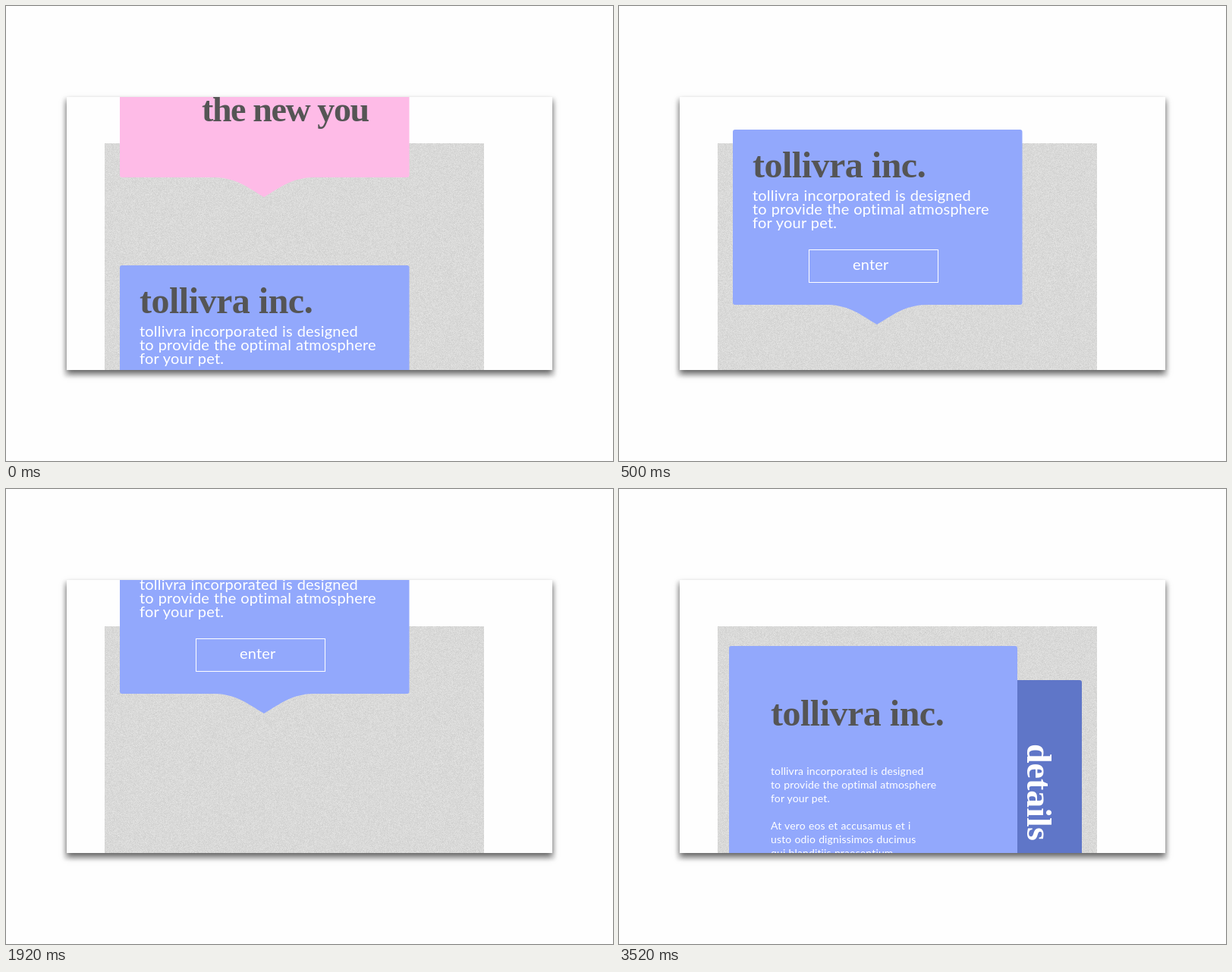
An HTML page with a canvas for the animation above (3.54 s loop, 800 by 600 pixels).

```html
<!DOCTYPE html>
<html lang="en">
<head>
<meta charset="utf-8">
<title>Card transition</title>
<style>
  html, body { margin: 0; width: 100%; height: 100%; overflow: hidden; background: #fefefe; }
  #stage {
    position: absolute; left: 80px; top: 120px; width: 640px; height: 360px;
    background: #fefefe;
    box-shadow: 0 5px 8px rgba(0, 0, 0, .6), 0 5px 4px 4px rgba(0, 0, 0, .06);
  }
  #stage > * { position: absolute; }
  #grain { left: 50px; top: 61px; }
  svg { left: 0; top: 0; overflow: hidden; }
  text { white-space: pre; }
  .title { font: bold 48px "Liberation Serif", "Noto Serif", serif; letter-spacing: -.5px; fill: #555; }
  .pink { font-size: 46px; letter-spacing: -1.4px; }
  .side { font-size: 46px; letter-spacing: 0; fill: #fff; }
  .body { font: 400 20px Lato, "Open Sans", sans-serif; letter-spacing: .2px; word-spacing: .5px; fill: #fff; }
  .small { font-size: 14px; letter-spacing: .14px; word-spacing: .35px; }
</style>
</head>
<body>
<div id="stage">
  <canvas id="grain" width="500" height="299"></canvas>
  <svg width="640" height="360" viewBox="80 120 640 360">
    <defs>
      <path id="bubble" d="M153 0H528.5Q531.5 0 531.5 3V228Q531.5 231 528.5 231H404
        C376 232 362 244 340 257C318 244 304 232 276 231H153Q150 231 150 228V3Q150 0 153 0Z"/>
    </defs>
    <g id="first">
      <use href="#bubble" fill="#febbe7"/>
      <text class="title pink" x="258" y="157">the new you</text>
    </g>
    <g id="second">
      <use href="#bubble" fill="#92a8fc"/>
      <text class="title" x="176" y="63">tollivra inc.</text>
      <text class="body" x="176" y="94">tollivra incorporated is designed</text>
      <text class="body" x="176" y="112">to provide the optimal atmosphere</text>
      <text class="body" x="176" y="130">for your pet.</text>
      <rect x="250.5" y="158.5" width="170" height="43" fill="none" stroke="#fff"/>
      <text class="body" x="308" y="185">enter</text>
    </g>
    <g id="panel">
      <rect x="515" width="95" height="400" rx="3" fill="#5f76c8"/>
      <text class="title side" transform="translate(538 84) rotate(90)">details</text>
    </g>
    <g id="page">
      <rect x="145" width="380" height="400" rx="3" fill="#92a8fc"/>
      <text class="title" x="200" y="105">tollivra inc.</text>
      <g id="copy"></g>
    </g>
  </svg>
</div>
<script>
const LOOP = 3540, STEP = 20, GAP = 347;
const byId = id => document.getElementById(id);
const clamp = x => Math.min(1, Math.max(0, x));
const progress = (t, start, length) => clamp((t - start) / length);
const smooth = x => x * x * (3 - 2 * x);
const remaining = x => (1 - x) ** 3;

const copy = [
  'tollivra incorporated is designed', 'to provide the optimal atmosphere', 'for your pet.', '',
  'At vero eos et accusamus et i', 'usto odio dignissimos ducimus', 'qui blanditiis praesentium'
];
copy.forEach((line, i) => {
  const text = document.createElementNS('http://www.w3.org/2000/svg', 'text');
  text.setAttribute('class', 'body small');
  text.setAttribute('x', 200);
  text.setAttribute('y', 170 + 18 * i);
  text.textContent = line;
  byId('copy').append(text);
});

function paintGrain(canvas) {
  const ctx = canvas.getContext('2d');
  const image = ctx.createImageData(canvas.width, canvas.height);
  let seed = 7;
  const random = () => (seed = (seed * 16807) % 2147483647) / 2147483647;
  for (let i = 0; i < image.data.length; i += 4) {
    const tone = 217 + (random() + random() - 1) * 12;
    image.data.set([tone, tone, tone - 1, 255], i);
  }
  ctx.putImageData(image, 0, 0);
}

function place(id, y) {
  byId(id).setAttribute('transform', `translate(0 ${Math.round(y)})`);
}

function draw(t) {
  const scroll = 203 * remaining(progress(t, 0, 980));
  const exit = 386 * smooth(progress(t, 1720, 600));
  const top = 139 + scroll - exit;
  place('first', top - GAP);
  place('second', top);
  place('panel', 252 + 350 * remaining(progress(t, 1850, 720)));
  place('page', 207 + 350 * remaining(progress(t, 2026, 850)));
}

const began = performance.now();
function tick() {
  const t = (performance.now() - began) % LOOP;
  draw(Math.floor(t / STEP) * STEP);
  requestAnimationFrame(tick);
}

paintGrain(byId('grain'));
draw(0);
requestAnimationFrame(tick);
</script>
</body>
</html>
```
